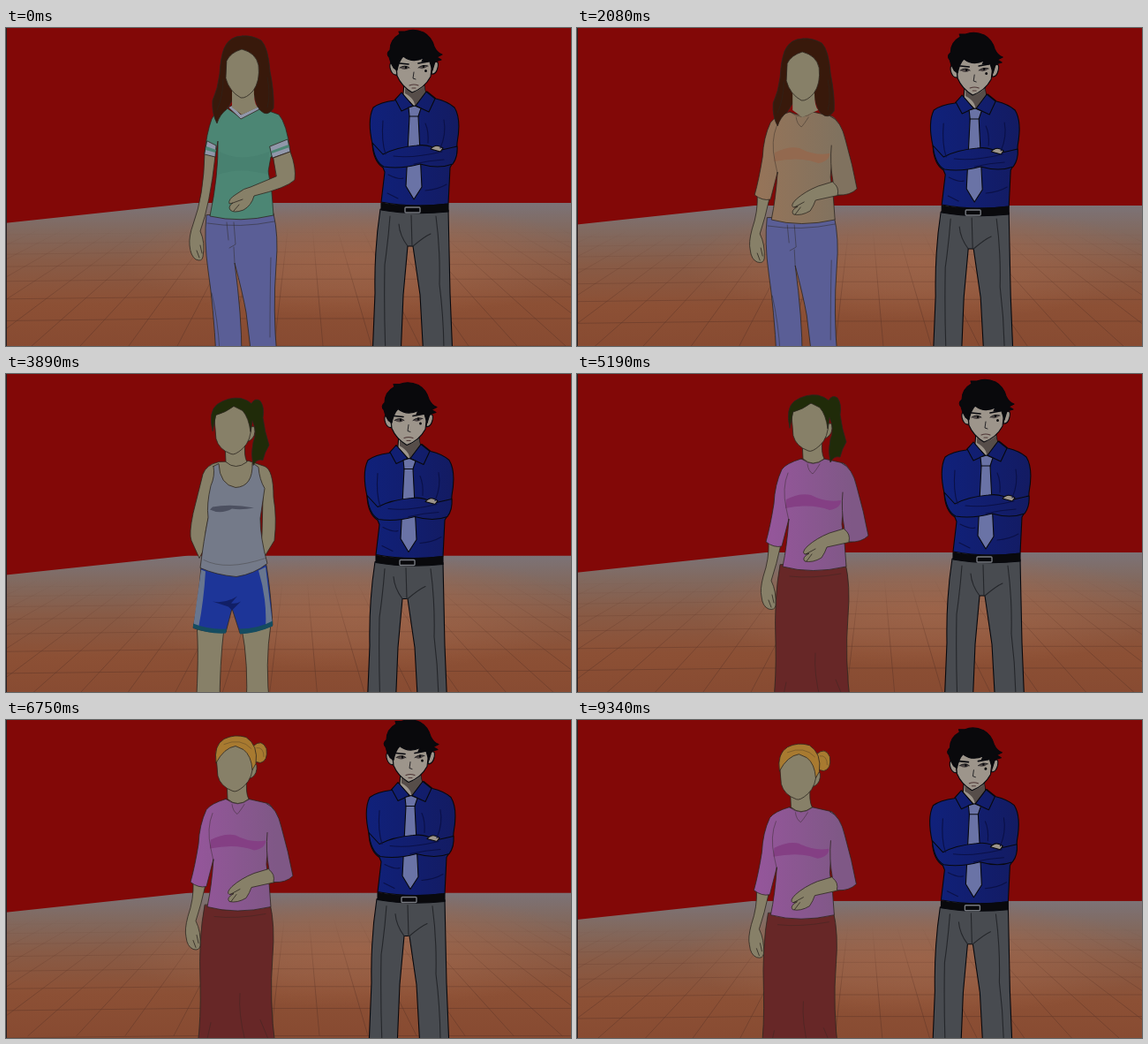
An HTML page for the animation above (9.44 s loop, 640x360 px).

```html
<!DOCTYPE html>
<html lang="en">
<head>
<meta charset="utf-8">
<title>Wardrobe</title>
<style>
html, body { margin: 0; width: 100%; height: 100%; overflow: hidden; background: #820807; }
svg { display: block; width: 640px; height: 360px; }
path, ellipse { stroke-linejoin: round; stroke-linecap: round; }
.line { fill: none; }
#woman { stroke: #2c2620; stroke-width: .8; }
#woman .flat { stroke: none; }
#woman .skin { fill: #878068; }
#woman .trim { fill: #9197aa; }
#woman .long { fill: #38190b; }
#woman .pony { fill: #202b09; }
#woman .bun { fill: #a87a30; }
#woman .cloth { fill: url(#cloth); }
#woman .shade { fill: var(--shade); }
#cloth stop:first-child { stop-color: var(--lit); }
#cloth stop:last-child { stop-color: var(--dim); }
#man { stroke: #07080d; stroke-width: 1.1; }
#man .flat { stroke: none; }
#man .skin { fill: #9d958b; }
#man .shirt { fill: url(#navy); }
#man .tie { fill: #6a73a6; }
#man .grey { fill: #484b50; }
#man .dark { fill: #09090c; }
</style>
</head>
<body>
<svg viewBox="0 0 640 360">
  <defs>
    <linearGradient id="ground" gradientUnits="userSpaceOnUse" x1="0" y1="198" x2="0" y2="365">
      <stop offset="0" stop-color="#7c7377"/>
      <stop offset=".18" stop-color="#81695f"/>
      <stop offset=".4" stop-color="#885b46"/>
      <stop offset=".68" stop-color="#8c5035"/>
      <stop offset="1" stop-color="#874a31"/>
    </linearGradient>
    <radialGradient id="glow" gradientUnits="userSpaceOnUse" cx="0" cy="0" r="1" gradientTransform="translate(400 262) scale(270 66)">
      <stop offset="0" stop-color="#a4674a" stop-opacity=".7"/>
      <stop offset=".5" stop-color="#a4674a" stop-opacity=".45"/>
      <stop offset="1" stop-color="#a4674a" stop-opacity="0"/>
    </radialGradient>
    <linearGradient id="joint" gradientUnits="userSpaceOnUse" x1="0" y1="225" x2="0" y2="320">
      <stop offset="0" stop-color="#5e3527" stop-opacity="0"/>
      <stop offset="1" stop-color="#5e3527" stop-opacity=".5"/>
    </linearGradient>
    <linearGradient id="cloth" gradientUnits="userSpaceOnUse" x1="220" y1="0" x2="310" y2="0">
      <stop offset="0"/>
      <stop offset="1"/>
    </linearGradient>
    <linearGradient id="navy" gradientUnits="userSpaceOnUse" x1="412" y1="0" x2="515" y2="0">
      <stop offset="0" stop-color="#10217b"/>
      <stop offset="1" stop-color="#131b62"/>
    </linearGradient>
    <clipPath id="room"><path d="M-40 225L213 198H700V400H-40Z"/></clipPath>
  </defs>
  <rect width="640" height="360" fill="#820807"/>
  <g id="scene">
    <g clip-path="url(#room)">
      <rect x="-40" y="190" width="740" height="210" fill="url(#ground)"/>
      <rect x="-40" y="190" width="740" height="210" fill="url(#glow)"/>
      <path id="tiles" class="line" stroke="url(#joint)"/>
    </g>

    <g id="woman">
      <g data-part="jeans">
        <path fill="#5a5e96" d="M227 212Q224 240 229 275Q235 315 238 372H267Q267 325 259 266Q268 300 272 322L278 372H307Q302 320 306 268Q309 235 303 210Z"/>
        <path class="line" d="M258 220L260 245L253 249M250 220L252 240M228 221Q265 227 304 219M259 266L258 248M233 300Q240 330 242 366M300 260Q299 300 299 350" opacity=".6"/>
      </g>
      <g data-part="skirt">
        <path fill="#672727" d="M229 212Q222 250 224 300Q225 340 221 372H309Q302 320 306 270Q309 235 303 210Z"/>
        <path class="line" d="M269 312Q267 335 275 366M292 342L302 366M236 345L231 368M240 225Q265 228 298 222" opacity=".45"/>
      </g>
      <g data-part="shorts">
        <path class="skin" d="M222 276Q225 310 221 372H248Q248 320 253 280ZM273 280Q281 320 278 372H305Q299 320 306 276Z"/>
        <path fill="#1d3598" d="M227 211Q224 250 218 280Q235 286 255 285L262 258L271 286Q290 285 308 277Q306 240 301 209Z"/>
        <path class="flat" fill="#68768f" d="M227 214L232 216Q230 250 224 280L218 279ZM300 211L292 215Q302 248 300 280L308 276Z"/>
        <path class="flat" fill="#154c60" d="M218 275Q235 282 256 281L255 286Q235 287 218 280ZM270 281Q292 281 308 272V278Q290 286 271 287Z"/>
        <path class="flat" fill="#111f66" d="M240 250Q254 253 268 244L261 252Q267 253 272 250L262 260L258 256Z"/>
      </g>

      <g data-part="tee">
        <path class="skin" d="M225 142Q224 190 212 222Q207 236 208 246Q209 258 215 262Q222 265 223 259Q226 243 220 230Q231 200 237 145Z"/>
        <path class="line" d="M216 252L219 260M220 246L222 255"/>
        <path fill="#4c8674" d="M249 90Q237 94 233 103Q227 120 225 142L237 146L240 128Q241 165 231 213Q265 221 303 212Q302 185 297 162L300 146L322 140Q318 108 309 98L287 90L267 102Z"/>
        <path class="flat" fill="#437a6b" d="M242 140Q265 153 298 140L297 166Q265 157 240 166Z" opacity=".45"/>
        <path class="trim" d="M252 90L266 103L289 91L285 89L266 98L256 88ZM228 128L238 133L237 146L225 143ZM299 134L319 126L322 140L302 147Z"/>
        <path class="flat" fill="#4c8674" d="M227 134L238 138L237 141L226 138ZM301 139L320 132L321 135L301 142Z"/>
        <path class="skin" d="M303 147L322 140Q329 158 327 172Q318 181 281 190Q278 201 269 206Q258 210 254 206Q251 202 257 198L253 199Q251 194 261 188Q270 181 277 180L306 168Z"/>
        <path class="line" d="M257 198L268 194M258 207L264 200"/>
      </g>

      <g data-part="blouse">
        <path class="skin" d="M216 186Q217 205 210 225Q206 240 208 248Q209 259 216 262Q223 264 224 258Q225 242 219 230Q225 212 230 189Z"/>
        <path class="line" d="M216 252L219 260M220 246L222 255"/>
        <path class="cloth" d="M253 92Q236 97 231 104Q223 121 222 143Q218 168 213 186Q222 193 231 191L239 160Q237 190 232 214Q265 223 304 214Q303 190 299 166L302 120Q312 103 301 97L279 92Q266 99 253 92Z"/>
        <path class="flat shade" d="M236 138Q252 130 264 133Q281 142 298 139Q298 148 285 150Q265 142 235 148Z"/>
        <path class="line" d="M253 92Q266 103 280 92M260 98Q261 106 266 109Q269 106 274 98M238 108Q231 125 236 148L239 162" opacity=".55"/>
        <path class="skin" d="M313 166Q301 172 285 176Q270 182 260 191Q253 198 257 200L262 199Q253 204 257 208Q266 210 276 204Q280 198 282 192L314 185Z"/>
        <path class="line" d="M258 200L269 194M259 208L265 200"/>
        <path class="flat cloth" d="M299 97Q311 102 316 124Q324 152 329 179Q321 187 307 186Q309 177 302 172Q296 140 300 121Z"/>
        <path class="line" d="M299 97Q311 102 316 124Q324 152 329 179Q321 187 307 186Q309 177 302 172Q298 150 300 130"/>
      </g>

      <g data-part="tank">
        <path class="skin" d="M247 92Q233 95 229 106Q223 130 218 150Q213 174 216 181L225 201L234 184L232 172L239 136L268 126L297 132L296 174L294 190L299 199L310 181Q313 155 309 132Q309 101 299 97L281 91Z"/>
        <path fill="#747a89" d="M241 97L247 94Q248 118 266 121Q286 120 285 93L292 98Q293 112 299 122L294 156Q294 178 302 207Q287 219 267 222Q244 220 226 212Q230 180 235 155Q233 140 238 119Q243 108 241 97Z"/>
        <path class="flat" fill="#4c5060" d="M240 143Q260 139 287 144Q272 147 262 145Q249 152 237 146Z"/>
        <path class="line" d="M230 203Q255 216 300 201" opacity=".4"/>
      </g>

      <g data-part="long">
        <path class="long" d="M268 9Q253 9 247 23Q243 34 242 52Q240 69 234 82Q233 97 239 108Q242 98 250 92L260 76L281 76Q285 92 289 94Q296 101 303 91Q304 74 299 49Q297 22 289 14Q278 8 268 9Z"/>
        <path class="flat skin" d="M256 66V90L267 98L285 90Q280 84 281 66Z"/>
        <path class="skin" d="M250 37Q254 28 267 24Q283 28 286 42Q288 60 280 71Q272 80 266 79Q253 72 249 57Z"/>
        <path class="line" d="M246 58Q246 77 239 93M296 56Q300 75 296 90" opacity=".6"/>
      </g>

      <g data-part="head">
        <path class="skin" d="M254 70L255 92Q266 102 279 92Q275 85 277 68Z"/>
        <path class="skin" d="M281 54Q289 48 288 58Q287 67 279 69Z"/>
        <path class="skin" d="M242 40Q252 27 270 29Q283 34 284 49Q284 68 274 77Q265 85 261 83Q247 78 244 66Z"/>
      </g>
      <path data-part="pony" class="pony" d="M240 57Q235 35 245 27Q258 18 272 20Q280 22 284 26Q288 19 294 23Q299 30 297 42Q299 58 304 73Q299 81 297 90Q290 88 286 96Q283 83 286 70Q291 58 285 45L283 58Q281 42 274 34L264 29Q255 36 244 39Z"/>
      <g data-part="bun">
        <path class="bun" d="M284 32Q294 23 299 35Q301 49 292 51L284 49Z"/>
        <path class="bun" d="M242 51Q239 31 251 24Q263 18 276 22Q290 31 287 52L283 59Q282 43 273 36L264 32Q251 34 242 51Z"/>
        <path class="line" d="M288 34Q296 33 296 44M251 30Q270 22 282 35" opacity=".4"/>
      </g>
    </g>

    <g id="man" transform="translate(-1 0)">
      <path class="grey" d="M425 205Q418 250 419 300L416 374H448L451 302L456 247H462L470 302L474 374H507L504 300L502 206Z"/>
      <path class="line" d="M436 213Q434 240 430 268Q429 320 431 370M488 213Q493 250 492 290Q497 330 497 370M460 212L461 247M456 247Q447 235 446 222M462 247Q475 236 482 233" stroke="#24262a"/>
      <path class="skin" d="M452 62L450 86L463 93L478 84L474 60Z"/>
      <path class="flat" fill="#564d49" d="M453 68Q464 77 475 65L477 84L464 92Q466 81 453 74Z"/>
      <path class="shirt" d="M449 74L441 82Q425 84 417 90Q410 104 416 131Q417 151 428 158L430 163L426 197Q462 204 502 199L504 158Q512 147 512 130Q517 103 509 90Q501 83 488 80L478 72L464 90Z"/>
      <path class="shirt" d="M449 73L442 81L449 94L462 88ZM477 72L487 80L480 95L465 88Z"/>
      <path class="tie" d="M457 90L464 88L471 91L468 100L472 180L463 194L454 179L458 100Z"/>
      <path class="line" d="M458 100H468"/>
      <path class="shirt" d="M416 130Q418 151 429 157Q448 160 470 154Q491 160 507 154Q513 146 512 134L490 139Q482 131 466 133Q443 135 428 143Z"/>
      <path class="skin" d="M482 137Q488 130 496 136L493 140Z"/>
      <path class="line" d="M428 105Q426 128 431 143M497 104Q500 120 493 136M440 145Q461 148 495 140M463 154Q480 150 497 149M434 166Q446 172 451 170M476 184Q490 183 500 177M433 187L445 193M476 108Q480 117 479 130" stroke="#0a1047"/>
      <path class="dark" d="M426 198Q460 204 502 199V208Q460 212 426 206Z"/>
      <rect x="453" y="203" width="17" height="6" rx="1" fill="none" stroke="#777a80" stroke-width="1.4"/>

      <path class="skin" d="M442 41Q435 36 436 45Q438 54 444 53ZM485 40Q492 35 490 45Q488 53 483 52Z"/>
      <path class="skin" d="M442 30L444 54Q449 66 461 73Q475 68 482 55L485 29Z"/>
      <path class="dark" d="M440 45Q436 39 435 33Q431 29 436 25Q436 13 447 7L446 4L453 4Q463 0 474 5Q483 10 486 21Q489 28 495 30L489 33L494 36L487 38L484 48L481 38L472 38L474 34Q461 40 451 32Q446 37 444 48Z"/>
      <path class="line" d="M447 40L457 41M468 40L479 38" stroke-width="1.7"/>
      <path class="flat" fill="#4f4746" d="M447 45Q453 41 458 45Q453 49 447 45ZM468 45Q473 41 479 43Q474 48 468 45Z"/>
      <path class="line" d="M447 45Q453 41 458 45M468 45Q473 41 479 43M463 50L462 57L465 58" stroke-width=".8"/>
      <path class="line" d="M458 65Q463 63 468 65M461 68H465" stroke="#4e3635"/>
      <path class="flat dark" d="M453 43h2v3h-2ZM473 42h2v3h-2Z"/>
      <ellipse class="flat dark" cx="476.5" cy="48.5" rx="1.4" ry="1.6"/>
    </g>
  </g>
  <rect width="1" height="360" fill="#2a2022"/>
</svg>
<script>
const LOOP = 9440;
const holds = [250, 250, 280, 280, 250, 250, 250, 270, 250, 280, 250, 250, 250, 250, 280, 270, 250, 280, 250,
  250, 280, 250, 250, 250, 250, 280, 280, 280, 250, 250, 250, 250, 280, 250, 250, 250, 100];

// Camera sway: time, x, y
const sway = [
  [0, 0, 0], [900, -7, -2.5], [2080, -11.8, 3], [3000, -10, 6.2], [3890, -6, 7.5], [5190, 1, 4],
  [6000, -.5, -.6], [6750, -4, -2.5], [7810, -9, 0], [8600, -11.5, 3.5], [9340, -12.6, 6.7]
];

const beige = { lit: '#957459', dim: '#80725f', shade: '#93694f' };
const pink = { lit: '#94569a', dim: '#7f5886', shade: '#843f84' };
const looks = [
  { from: 0, worn: 'long tee jeans' },
  { from: 1060, worn: 'long blouse jeans', cloth: beige },
  { from: 3110, worn: 'head pony tank shorts' },
  { from: 4410, worn: 'head pony blouse skirt', cloth: pink },
  { from: 5970, worn: 'head bun blouse skirt', cloth: pink }
];

const svg = document.querySelector('svg');
const scene = document.getElementById('scene');
const parts = [...document.querySelectorAll('[data-part]')];

function layTiles() {
  let d = '';
  for (let x = -1126; x < 1800; x += 55) d += `M335 90L${x} 360`;
  for (let n = -1; n < 9; n++) {
    const y = 90 + 270 / (1 + .13 * n);
    d += `M-40 ${y + 3}L213 ${y}H700`;
  }
  document.getElementById('tiles').setAttribute('d', d);
}

function stepStart(t) {
  let start = 0;
  for (const hold of holds) {
    if (t < start + hold) break;
    start += hold;
  }
  return start;
}

// Cubic Hermite curve through the sway points
function swayAt(t, axis) {
  const last = sway.length - 1;
  const at = i => sway[Math.max(0, Math.min(last, i))];
  const slope = i => (at(i + 1)[axis] - at(i - 1)[axis]) / (at(i + 1)[0] - at(i - 1)[0]);
  let i = 0;
  while (i < last - 1 && t >= sway[i + 1][0]) i++;
  const [a, b] = [at(i), at(i + 1)];
  const span = b[0] - a[0];
  const u = (t - a[0]) / span;
  const v = 1 - u;
  return v * v * (1 + 2 * u) * a[axis] + u * u * (3 - 2 * u) * b[axis]
    + span * u * v * (v * slope(i) - u * slope(i + 1));
}

function dress({ worn, cloth = {} }) {
  const names = worn.split(' ');
  for (const part of parts) part.style.display = names.includes(part.dataset.part) ? '' : 'none';
  for (const tone in cloth) svg.style.setProperty('--' + tone, cloth[tone]);
}

let shown = -1;
function draw(now) {
  const t = stepStart(now % LOOP);
  if (t === shown) return;
  shown = t;
  scene.setAttribute('transform', `translate(${swayAt(t, 1).toFixed(2)} ${swayAt(t, 2).toFixed(2)})`);
  dress(looks.filter(look => look.from <= t).pop());
}

const began = performance.now();
function tick() {
  draw(performance.now() - began);
  requestAnimationFrame(tick);
}
layTiles();
tick();
</script>
</body>
</html>
```
